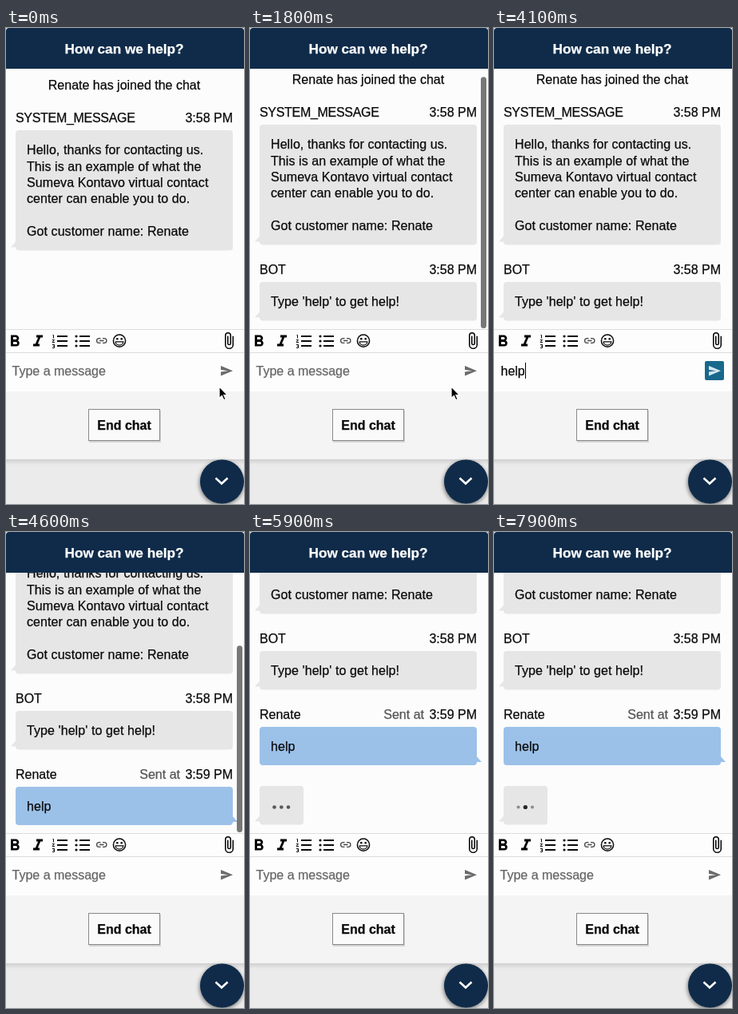
An HTML page for the animation above (8 s loop, 298x596 px).

```html
<!DOCTYPE html>
<html lang="en">
<head>
<meta charset="utf-8">
<title>Chat widget</title>
<style>
html, body { margin: 0; width: 100%; height: 100%; overflow: hidden; background: #ebebeb; }
svg { display: block; }
text {
  --ink: #0a0a0a;
  font: 16px "Liberation Sans", Arial, sans-serif;
  fill: var(--ink); stroke: var(--ink); stroke-width: .25px; white-space: pre;
}
.bold { font-weight: bold; }
.mid { text-anchor: middle; }
.end { text-anchor: end; }
.navy { fill: #0f2b49; }
.line { fill: none; stroke: #0a0a0a; }
</style>
</head>
<body>
<svg width="298" height="596" viewBox="0 0 298 596">
  <defs>
    <linearGradient id="shade" x2="0" y2="1">
      <stop stop-color="#cfcfcf"/><stop offset="1" stop-color="#ebebeb"/>
    </linearGradient>
    <filter id="soft" x="-30%" y="-30%" width="160%" height="160%"><feGaussianBlur stdDeviation="2.5"/></filter>
  </defs>
  <rect width="298" height="596" fill="#ebebeb"/>
  <rect y="540" width="298" height="7" fill="url(#shade)"/>
  <rect y="51" width="298" height="489" fill="#fcfcfc"/>

  <g id="chat"></g>
  <rect id="bar" x="289" width="7" rx="3.5" fill="#777"/>

  <rect width="298" height="51" fill="#ebebeb"/>
  <path class="navy" d="M0 51V4a4 4 0 0 1 4-4H294a4 4 0 0 1 4 4V51z"/>
  <text class="bold mid" x="148" y="32" style="--ink:#fff;font-size:17.2px">How can we help?</text>

  <rect y="377" width="298" height="78" fill="#fdfdfd"/>
  <path d="M0 377.5H298M0 406.5H298" stroke="#dcdcdc"/>
  <g id="tools">
    <path transform="translate(-1 380.5)" d="M15.6 10.8c1-.7 1.65-1.8 1.65-2.8 0-2.3-1.75-4-4-4H7v14h7c2.1 0 3.75-1.7 3.75-3.8 0-1.5-.9-2.8-2.15-3.4zM10 6.5h3a1.5 1.5 0 0 1 0 3h-3zm3.5 9H10v-3h3.5a1.5 1.5 0 0 1 0 3z"/>
    <path transform="translate(28 380.5)" d="M10 4v3h2.2l-3.4 8H6v3h8v-3h-2.2l3.4-8H18V4z"/>
    <path class="line" stroke-width="2" d="M64 386h13M64 392h13M64 398h13M92 386h13M92 392h13M92 398h13"/>
    <path class="line" d="M58.5 384.5h1v4M58 390.5h2.5l-2.5 3h3M58 396.5h2.5v4h-2.5M59 398.5h1.5"/>
    <path class="line" stroke-width="3.2" stroke-linecap="round" d="M88 386h0M88 392h0M88 398h0"/>
    <path class="line" stroke-width="1.3" style="stroke:#444" d="M118.5 388.6h-2a2.9 2.9 0 0 0 0 5.8h2M121 388.6h2a2.9 2.9 0 0 1 0 5.8h-2M117 391.5h5.5"/>
    <circle class="line" cx="142" cy="391.7" r="7.6" stroke-width="1.5"/>
    <circle cx="139.3" cy="389.2" r="1.3"/><circle cx="144.7" cy="389.2" r="1.3"/>
    <path class="line" stroke-width="1.2" d="M137.2 392.8h9.6a4.8 4.4 0 0 1-9.6 0z"/>
    <path transform="translate(267 380) scale(1 .96)" d="M16.5 6v11.5a4 4 0 0 1-8 0V5a2.5 2.5 0 0 1 5 0v10.5a1 1 0 0 1-2 0V6H10v9.5a2.5 2.5 0 0 0 5 0V5a4 4 0 0 0-8 0v12.5a5.5 5.5 0 0 0 11 0V6z"/>
  </g>

  <text id="input" y="435"></text>
  <path id="caret" d="M0 419v20" stroke="#000"/>
  <rect id="send" x="264" y="417" width="24" height="24" rx="2" fill="#18688c"/>
  <path id="plane" d="M269 423l15 6.3-15 6.3v-5l9-1.3-9-1.3z"/>

  <rect y="455" width="298" height="85" fill="#f4f4f4"/>
  <rect x="104" y="479" width="90" height="40" fill="#0002"/>
  <rect x="103.5" y="477.5" width="89" height="39" fill="#fafafa" stroke="#888"/>
  <text class="bold mid" x="148" y="503">End chat</text>

  <circle cx="270" cy="570" r="28" fill="#0007" filter="url(#soft)"/>
  <circle class="navy" cx="270.5" cy="568" r="27.5"/>
  <path d="M262.5 563.5l7.5 7 7.5-7" fill="none" stroke="#fff" stroke-width="2.6"/>
  <path id="mouse" d="M0 0v14.5l3.3-3 2.4 5.3 2.4-1-2.3-5.2h4.5z" stroke="#fff" stroke-width="1.2"/>
</svg>
<script>
const LOOP = 8000, BOT_AT = 1300, SENT_AT = 4400, TYPING_AT = 5000;
const KEYS = [3400, 3500, 3600, 3800];
const SCROLLS = [[TYPING_AT, 176], [SENT_AT, 101], [BOT_AT, 7], [0, 0]];
const $ = id => document.getElementById(id);

const text = (x, y, s, attrs = '') => `<text x="${x}" y="${y}" ${attrs}>${s}</text>`;
const body = (y, s) => text(26, y, s, 'letter-spacing=".08"');

function bubble(y, h, w = 272, mine = false) {
  const b = y + h, x = mine ? 283 : 13, tip = mine ? 290 : 6;
  const fill = mine ? '#9cc1e9' : '#e6e6e6';
  return `<rect x="12" y="${y}" width="${w}" height="${h}" rx="4" fill="${fill}"/>
    <path d="M${x} ${b - 12}L${tip} ${b - 4}H${x}z" fill="${fill}"/>`;
}

const heading = (y, name, time, attrs) =>
  text(12, y, name, attrs) + text(284, y, time, 'class="end"');

const group = (id, content) => `<g id="${id}">${content}</g>`;

const greeting = ['Hello, thanks for contacting us.', 'This is an example of what the',
  'Sumeva Kontavo virtual contact', 'center can enable you to do.', '',
  'Got customer name: Renate'];

$('chat').innerHTML =
  text(148, 77, 'Renate has joined the chat', 'class="mid"') +
  heading(118, 'SYSTEM_MESSAGE', '3:58 PM', 'letter-spacing="-.3"') +
  bubble(128, 150.5) +
  greeting.map((s, i) => body(158.4 + i * 20.3, s)).join('') +
  group('bot', heading(315, 'BOT', '3:58 PM') + bubble(325, 48.5) +
    body(355, "Type 'help' to get help!")) +
  group('mine', heading(410, 'Renate', '3:59 PM') +
    text(218, 410, 'Sent at', 'class="end" style="--ink:#555"') +
    bubble(420, 48, 272, true) + body(450, 'help')) +
  group('typing', bubble(494, 48.5, 55) +
    [30.5, 39.3, 48].map(x => `<circle cx="${x}" cy="520.5"/>`).join(''));

const dots = document.querySelectorAll('#typing circle');
const clamp = v => Math.max(0, Math.min(1, v));
const ease = v => (v = clamp(v), v * v * (3 - 2 * v));
const show = (id, on) => $(id).style.display = on ? '' : 'none';

function draw(t) {
  const [since, scroll] = SCROLLS.find(([at]) => t >= at);
  $('chat').setAttribute('transform', `translate(0 ${-scroll})`);
  show('bot', t >= BOT_AT);
  show('mine', t >= SENT_AT);
  show('typing', t >= TYPING_AT);

  // The scrollbar shrinks as the log grows, then fades out
  const thumb = 323 / (1 + scroll / 265);
  $('bar').setAttribute('y', 376 - thumb);
  $('bar').setAttribute('height', thumb);
  $('bar').style.opacity = scroll ? 1 - clamp((t - since - 550) / 200) : 0;

  const typed = t < SENT_AT ? KEYS.filter(k => t >= k).length : 0;
  const input = $('input');
  input.textContent = typed ? 'help'.slice(0, typed) : 'Type a message';
  input.setAttribute('x', typed ? 8.5 : 7.5);
  input.style.setProperty('--ink', typed ? '#0a0a0a' : '#666');
  show('caret', typed);
  show('send', typed);
  $('caret').setAttribute('transform',
    `translate(${typed ? Math.round(9 + input.getComputedTextLength()) + .5 : 0} 0)`);
  $('plane').setAttribute('fill', typed ? '#d5e6ee' : '#6c6c6c');

  const slide = ease((t - 100) / 400), away = ease((t - 2100) / 500);
  $('mouse').setAttribute('transform',
    `translate(${267 - 15 * slide - 80 * away} ${449 - 18 * away})`);
  show('mouse', t < 2600);

  // Outer dots pulse against the middle one
  const wave = Math.sin((t - 5900) / 1600 * 2 * Math.PI);
  dots.forEach((dot, i) => {
    const v = i === 1 ? wave : -wave;
    const grey = 88 - 52 * v;
    dot.setAttribute('r', 2.3 + .3 * v);
    dot.setAttribute('fill', `rgb(${grey},${grey},${grey})`);
  });
}

function tick() {
  draw(performance.now() % LOOP);
  requestAnimationFrame(tick);
}
tick();
</script>
</body>
</html>
```
